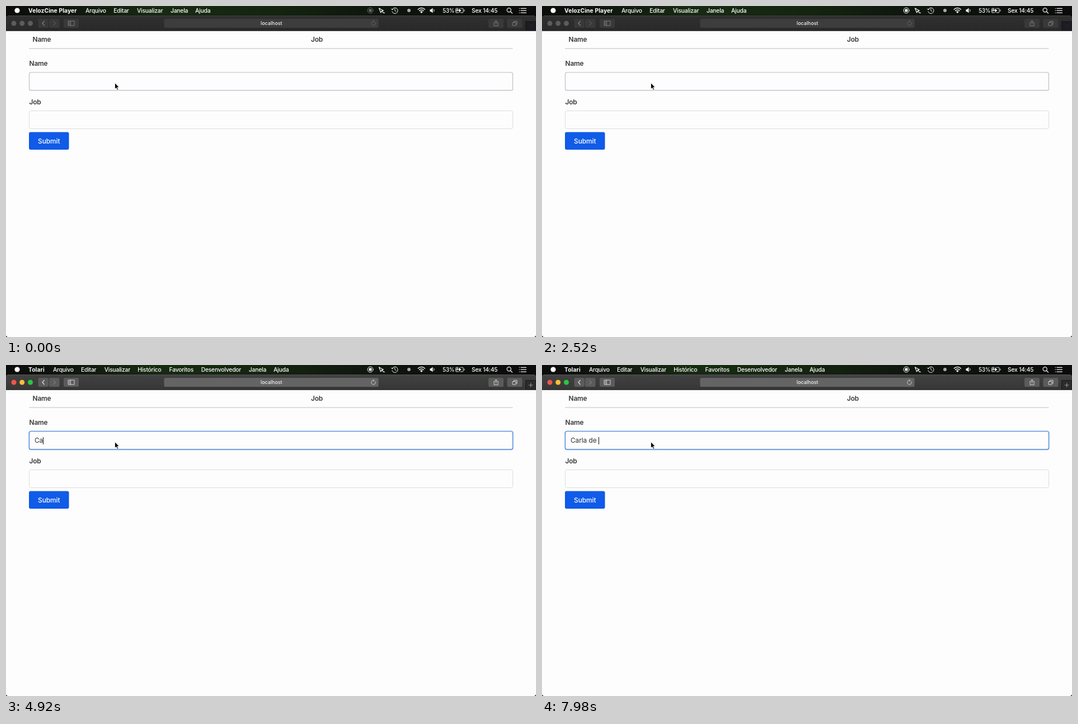
Recreate the animation shown at these times as an HTML page. Size 947 by 592 pixels, loop 8 s.

```html
<!DOCTYPE html>
<html lang="pt">
<head>
<meta charset="utf-8">
<title>Form</title>
<style>
html, body { margin: 0; width: 100%; height: 100%; overflow: hidden; background: #000; }
svg { position: absolute; left: 0; top: 0; display: block; }
text { font-family: Inter, sans-serif; }
#stage {
  --bar-top: #303030; --bar-end: #292929; --btn: #393939; --url: #3d3d3d;
  --icon: #858585; --soft: #5d5d5d; --reload: #666;
  --red: #5c5c5c; --amber: #5c5c5c; --green: #5c5c5c;
  --tab: #1c1c23; --plus: #25252d; --border: #b9bac6; --glow: none;
}
#stage.active {
  --bar-top: #424242; --bar-end: #363636; --btn: #5b5b5b; --url: #646464;
  --icon: #e4e4e4; --soft: #858585; --reload: #d5d5d5;
  --red: #f4544b; --amber: #f6bd35; --green: #28c840;
  --tab: #2b2b2b; --plus: #9a9a9a; --border: #3d7bd0; --glow: #d5e4f7;
}
.menu text, .status text { font-size: 10.3px; letter-spacing: -.2px; fill: #fff; font-weight: 500; }
.menu text.app { font-weight: 700; letter-spacing: .1px; }
#browser-menu, .active #player-menu { display: none; }
.active #browser-menu { display: inline; }
.line { fill: none; stroke: #f2f2f2; stroke-linecap: round; stroke-linejoin: round; }
.tool { fill: none; stroke: var(--icon); stroke-linecap: round; stroke-linejoin: round; }
.btn { fill: var(--btn); }
.bold { font-size: 11.84px; font-weight: 600; letter-spacing: -.1px; fill: #363636; }
#entry {
  position: absolute; left: 51px; top: 127px; height: 16px; line-height: 16px;
  font: 400 11.84px/16px Inter, sans-serif; color: #303030; white-space: pre; display: flex;
  align-items: center; letter-spacing: -.05px;
}
#caret { width: 1px; height: 13px; background: #111; }
#pointer { pointer-events: none; }
</style>
</head>
<body>
<svg id="stage" width="947" height="592" viewBox="0 0 947 592">
  <defs>
    <linearGradient id="sky">
      <stop offset="0" stop-color="#0b0d0b"/>
      <stop offset=".13" stop-color="#10180e"/>
      <stop offset=".28" stop-color="#172b12"/>
      <stop offset=".5" stop-color="#14250f"/>
      <stop offset=".68" stop-color="#0f170e"/>
      <stop offset="1" stop-color="#0a0b0a"/>
    </linearGradient>
    <linearGradient id="chrome" x2="0" y2="1">
      <stop offset="0" style="stop-color:var(--bar-top)"/>
      <stop offset="1" style="stop-color:var(--bar-end)"/>
    </linearGradient>
  </defs>

  <rect width="947" height="592"/>
  <rect width="947" height="16.5" fill="url(#sky)"/>
  <circle cx="20" cy="8" r="4.6" fill="#fff"/>
  <g class="menu" id="player-menu"></g>
  <g class="menu" id="browser-menu"></g>

  <g class="status">
    <g id="record">
      <circle class="line" cx="651" cy="8" r="5"/>
      <rect x="648.5" y="5.5" width="5" height="5" rx=".6" fill="#fff"/>
    </g>
    <path class="line" stroke-width="1.2" d="M666.5 4l3.2 8 1.5-3 3.2-.8zM671.5 9l3 3.3h2"/>
    <path class="line" d="M690 6.3a5.2 5.2 0 1 1-.2 3.5M688.4 5l1.6 2 2-1.4M694.8 5v3.3l2.2 1.3"/>
    <circle cx="720" cy="8" r="3" fill="#aaa"/>
    <path class="line" stroke-width="1.5" d="M736.3 6.1a8.4 8.4 0 0 1 12 0M738.6 8.4a5.3 5.3 0 0 1 7.4 0"/>
    <path d="M739.9 10.2a3.6 3.6 0 0 1 4.8 0l-2.4 2.8z" fill="#fff"/>
    <path d="M757.5 6.3h2l3-2.7v9l-3-2.7h-2z" fill="#fff"/>
    <path class="line" d="M764.5 6.2a3 3 0 0 1 0 3.8"/>
    <text x="780.3" y="11.6" style="font-size:9.7px">53%</text>
    <path class="line" d="M808 4.3h-3.2q-1.3 0-1.3 1.3v5q0 1.3 1.3 1.3h3M813.5 4.3h2.2q1.3 0 1.3 1.3v5q0 1.3-1.3 1.3h-3.5M819 7v2.2"/>
    <path d="M805 5.8h3l-2.5 4.6h-.5zM812.2 3l-5.2 5.7h3l-1.4 4.2 5.2-5.8h-3z" fill="#fff"/>
    <text x="832" y="11.8">Sex 14:45</text>
    <path class="line" stroke-width="1.2" d="M901.5 10l3 3"/>
    <circle class="line" stroke-width="1.2" cx="898.7" cy="7.2" r="3.6"/>
    <path class="line" stroke-width="1.3" d="M917.3 4.3h.2M920 4.3h9.5M917.3 8.2h.2M920 8.2h9.5M917.3 12.1h.2M920 12.1h9.5"/>
  </g>

  <path d="M0 44.5V20.5q0-3.5 3.5-3.5h940q3.5 0 3.5 3.5v24z" fill="url(#chrome)"/>
  <path d="M3 17.4h941" stroke="#fff" stroke-opacity=".16" stroke-width=".8"/>
  <circle cx="14" cy="31" r="4.5" fill="var(--red)"/>
  <circle cx="28.7" cy="31" r="4.5" fill="var(--amber)"/>
  <circle cx="43.5" cy="31" r="4.5" fill="var(--green)"/>
  <g class="btn">
    <rect x="57.5" y="23" width="18.5" height="16" rx="2.5"/>
    <rect x="77" y="23" width="18.5" height="16" rx="2.5"/>
    <rect x="103" y="23" width="27" height="16" rx="2.5"/>
    <rect x="862" y="23" width="27" height="16" rx="2.5"/>
    <rect x="895.5" y="23" width="27" height="16" rx="2.5"/>
  </g>
  <path class="tool" stroke-width="1.2" d="M68.5 27.2l-3.5 3.8 3.5 3.8"/>
  <path class="tool" style="stroke:var(--soft)" stroke-width="1.1" d="M85 27.4l3.3 3.6-3.3 3.6"/>
  <path class="tool" stroke-width=".9" d="M111.5 27h10.5v8h-10.5zM115.3 27v8M112.8 29h1M112.8 31h1M112.8 33h1"/>
  <rect x="282.5" y="23" width="383" height="16" rx="2.5" fill="var(--url)"/>
  <text x="474.3" y="34.4" text-anchor="middle" font-size="8.9" font-weight="500" fill="#f1f1f1">localhost</text>
  <path class="tool" style="stroke:var(--reload)" stroke-width=".9" d="M660 29.6a3.8 3.8 0 1 1-2.7-2.2M656.3 25.8l1.7 1.7-1.8 1.5"/>
  <path class="tool" stroke-width=".9" d="M873.5 29.3H872v6.2h7.2v-6.2h-1.6M875.6 32.5v-6.3M873.7 28l1.9-1.9 1.9 1.9"/>
  <path class="tool" stroke-width=".9" d="M905.5 29.5h5.5v5.5h-5.5zM907.5 29.3v-2h5.6v5.6h-1.8"/>
  <path d="M928.5 44V27.5H947V44z" fill="var(--tab)" stroke="#171717"/>
  <path d="M934 36h7.5M937.7 32.2v7.5" stroke="var(--plus)"/>
  <path d="M0 44.2h947" stroke="#141414"/>

  <path d="M0 44.8h947V588q0 4-4 4H4q-4 0-4-4z" fill="#fdfdfd"/>
  <g class="bold">
    <text x="47.5" y="64.3">Name</text>
    <text x="545" y="64.3">Job</text>
    <text x="41.5" y="107.2">Name</text>
    <text x="41.5" y="176.1">Job</text>
  </g>
  <path d="M41 76.2h864.5" stroke="#c9cbd1" stroke-width="1.2"/>
  <rect x="40.7" y="117.9" width="865.6" height="33.8" rx="4" fill="none" stroke="var(--glow)" stroke-width="2.4"/>
  <rect x="41.5" y="118.7" width="864" height="32.2" rx="3" fill="#fdfdfd" stroke="var(--border)" stroke-width="1.1"/>
  <rect x="41.5" y="187.5" width="864" height="32" rx="3" fill="#fdfdfd" stroke="#dcdce1"/>
  <rect x="41" y="225.5" width="71.5" height="31.5" rx="3" fill="#105be8"/>
  <text x="76.8" y="245.6" text-anchor="middle" font-size="11.84" font-weight="500" fill="#fff">Submit</text>
</svg>
<div id="entry"><span id="typed"></span><span id="caret"></span></div>
<svg id="pointer" width="947" height="592">
  <path d="M194.5 137.6v11l2.5-2.3 1.8 4 1.8-.8-1.8-3.9h3.4z" stroke="#fff" stroke-width=".8"/>
</svg>
<script>
const LOOP = 8000, RECORDING = 840, FOCUS = 2840;
const NAME = 'Carla de ';
const KEY_TIMES = [4180, 4520, 5020, 5300, 5600, 6040, 6300, 6620, 7540];
const CARET_OFF = [3420, 3920];
const byId = id => document.getElementById(id);

function fillMenu(id, items) {
  items.forEach(([x, label], i) => {
    const item = document.createElementNS('http://www.w3.org/2000/svg', 'text');
    item.setAttribute('x', x);
    item.setAttribute('y', 11.8);
    if (i === 0) item.setAttribute('class', 'app');
    item.textContent = label;
    byId(id).append(item);
  });
}

fillMenu('player-menu', [[40, 'VelozCine Player'], [142, 'Arquivo'], [192.3, 'Editar'],
  [234, 'Visualizar'], [294, 'Janela'], [338, 'Ajuda']]);
fillMenu('browser-menu', [[40, 'Tolari'], [84, 'Arquivo'], [134, 'Editar'], [175.7, 'Visualizar'],
  [235.2, 'Histórico'], [291.5, 'Favoritos'], [348.7, 'Desenvolvedor'], [433.8, 'Janela'], [478, 'Ajuda']]);

function draw(now) {
  const t = now % LOOP;
  const active = t >= FOCUS;
  const blinkedOff = t >= CARET_OFF[0] && t < CARET_OFF[1];
  byId('stage').classList.toggle('active', active);
  byId('record').style.opacity = t < RECORDING ? .38 : 1;
  byId('typed').textContent = NAME.slice(0, KEY_TIMES.filter(key => t >= key).length);
  byId('caret').style.visibility = active && !blinkedOff ? 'visible' : 'hidden';
}

const start = performance.now();
function tick() {
  draw(performance.now() - start);
  requestAnimationFrame(tick);
}
tick();
</script>
</body>
</html>
```
